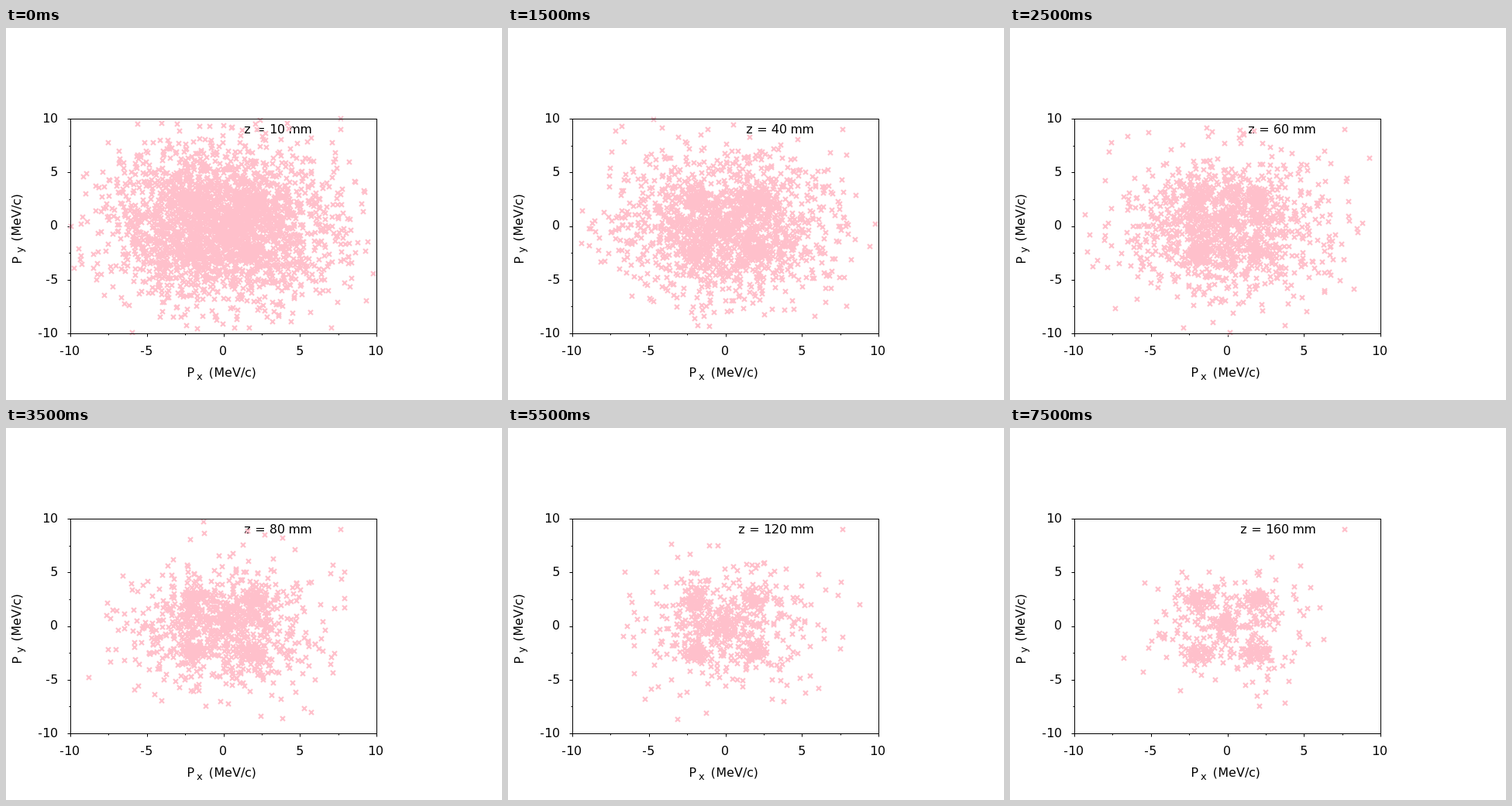
A matplotlib script that plays this animation: 640 by 480 pixels, repeating every 8 s.

```python
import matplotlib.pyplot as plt
import numpy as np
from matplotlib.animation import FuncAnimation

W, H, DPI = 640, 480, 72
LEFT, TOP, RIGHT, BOTTOM = 83, 117, 478, 394
FRAMES, STEP_MS = 16, 500
LIMIT = 10
MARK = dict(marker="x", ls="none", ms=5.2, mew=2.2, color="#ffc0cb", clip_on=False)

plt.rcParams.update({"font.family": "DejaVu Sans", "font.size": 16,
                     "text.hinting_factor": 1})

fig = plt.figure(figsize=(W / DPI, H / DPI), dpi=DPI, facecolor="white")
ax = fig.add_axes([LEFT / W, 1 - BOTTOM / H, (RIGHT - LEFT) / W, (BOTTOM - TOP) / H])
ax.set(xlim=(-LIMIT, LIMIT), ylim=(-LIMIT, LIMIT))
for spine in ax.spines.values():
    spine.set_linewidth(1)


def put(x, y, text, **style):
    """Place text with its baseline at a pixel counted from the top left."""
    style = {"va": "baseline", "zorder": 1, **style}
    return ax.text(x / W, 1 - y / H, text, transform=fig.transFigure, **style)


def draw_axes():
    majors = np.arange(-LIMIT, LIMIT + 1, 5)
    for axis in (ax.xaxis, ax.yaxis):
        axis.set_ticks(majors)
        axis.set_ticks(majors[:-1] + 2.5, minor=True)
    ax.tick_params(labelbottom=False, labelleft=False, width=1, length=4)
    ax.tick_params(which="minor", width=1, length=2)

    for v in majors:
        part = (v + LIMIT) / (2 * LIMIT)
        put(LEFT + part * (RIGHT - LEFT) - 1, 422, f"{v}", ha="center")
        put(67, BOTTOM - part * (BOTTOM - TOP) + 5, f"{v}", ha="right")

    put(233, 450, "P")
    put(246, 454, "x", size=12.8)
    put(262, 450, "(MeV/c)")
    turned = dict(rotation=90, rotation_mode="anchor")
    put(19, 302, "P", **turned)
    put(23, 289, "y", size=12.8, **turned)
    put(19, 273, "(MeV/c)", **turned)


def beam(i):
    """Momenta of the particles left at step i: a decaying halo and a stable core."""
    rng = np.random.default_rng(40 + i)
    age = 10 * i
    spread = 3.65 * np.exp(-age / 400)
    count = int(2450 * np.exp(-age / 61))
    parts = [rng.normal(0, spread, (count, 2))]

    for sx in (-1, 1):
        for sy in (-1, 1):
            parts.append(rng.normal((1.95 * sx, 2.55 * sy), (0.4, 0.48), (50, 2)))
        parts.append(np.column_stack([rng.normal(1.85 * sx, 0.35, 20),
                                      rng.uniform(-3, 3, 20)]))

    along = rng.normal(0, 1, 48)
    parts.append(np.column_stack([0.4 * along, 0.2 + 0.8 * along])
                 + rng.normal(0, 0.4, (48, 2)))

    p = np.vstack(parts)
    return p[np.all(np.abs(p) <= LIMIT, axis=1)].T


draw_axes()
key_text = put(395, 136, "", ha="right")
ax.plot([7.65], [9.0], **MARK)
cloud, = ax.plot([], [], **MARK)


def update(i):
    cloud.set_data(*beam(i))
    key_text.set_text(f"z = {10 * (i + 1)} mm")
    return cloud, key_text


anim = FuncAnimation(fig, update, frames=FRAMES, interval=STEP_MS,
                     repeat=True, repeat_delay=0)
plt.show()
```
